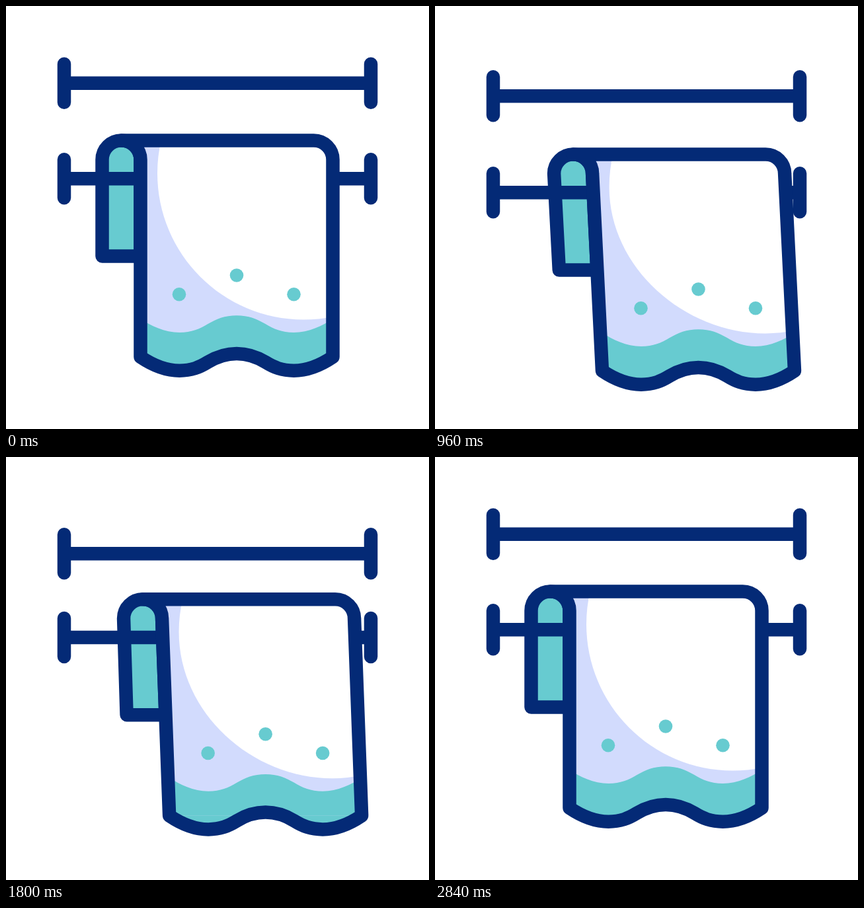
An HTML page with a canvas that plays this animation: 640 by 640 pixels, repeating every 3 s.

```html
<!DOCTYPE html>
<html lang="en">
<head>
<meta charset="utf-8">
<title>Towel on a rail</title>
<style>
  html, body { margin: 0; width: 100%; height: 100%; overflow: hidden; background: #fff; }
  canvas { display: block; width: 640px; height: 640px; }
</style>
</head>
<body>
<canvas id="stage" width="640" height="640"></canvas>
<script>
const ctx = document.getElementById('stage').getContext('2d');
const NAVY = '#042a76', TEAL = '#67cbd0', SHADE = '#d2dbfd';
const LOOP = 3000;

// Keys are [time, value]; every segment eases in and out.
const upperDrop = [[515, 0], [1312, 33], [1640, 33], [2443, 0]];
const lowerDrop = [[335, 0], [1150, 24.3], [1340, 24.3], [2240, 0]];
const slide = [[100, 0], [900, 34.6], [1669, 34.6], [2561, 0]];
const hemSwing = [[100, 0], [510, -22], [930, 15.5], [1260, -9.3], [1600, 0],
                  [2000, 22], [2390, -12.5], [2640, 6], [2840, 0]];
const flapSwing = [[100, 0], [510, -7.7], [930, 8], [1260, -4.2], [1600, 0],
                   [2000, 9], [2390, -6.5], [2640, 3], [2840, 0]];

function valueAt(keys, t) {
  if (t <= keys[0][0]) return keys[0][1];
  for (let i = 1; i < keys.length; i++) {
    const [t0, v0] = keys[i - 1], [t1, v1] = keys[i];
    if (t < t1) {
      const u = (t - t0) / (t1 - t0);
      return v0 + (v1 - v0) * u * u * (3 - 2 * u);
    }
  }
  return keys[keys.length - 1][1];
}

function fill(path, color) {
  ctx.fillStyle = color;
  ctx.fill(path);
}

function rail(y) {
  ctx.lineCap = 'round';
  ctx.stroke(new Path2D(`M88 ${y - 29}v58M552 ${y - 29}v58M88 ${y}H552`));
}

// Wavy edge from left to right, starting at the current point.
const WAVE = 'c15.5 10.5 36.5 20.7 59 20.7c18.5 0 30.5-5.2 43-12.9' +
  's25.5-12.9 43.5-12.9s31 5.2 43.5 12.9s24.5 12.9 43 12.9c22.5 0 43.5-10.2 59-20.7';

function flap(x, flapX, hemX) {
  const seam = 203.5 + x + (hemX - x) * 0.489;
  const path = new Path2D(`M${seam} 378.5H${145.5 + flapX}L${145.5 + x} 232.5` +
    `a29 29 0 0 1 58 0Z`);
  fill(path, TEAL);
  ctx.stroke(path);
}

function front(x, hemX) {
  const left = 203.5 + hemX;
  const outline = new Path2D(`M${left} 531L${203.5 + x} 232.5a29 29 0 0 0-29-29` +
    `H${465.5 + x}a29 29 0 0 1 29 29L${494.5 + hemX} 531L${left} 531${WAVE}`);
  const light = new Path2D(`M${235.5 + x} 200Q${229 + x} 226 ${229 + x} 253` +
    `C${229 + x} 375 ${328 + hemX} 474.5 ${450 + hemX} 474.5` +
    `S${671 + x} 375 ${671 + x} 253V200Z`);
  const band = new Path2D(`M${left - 10} 590V466L${left} 473.3${WAVE}l10-7V590Z`);
  const edge = new Path2D(`M${left} 531L${203.5 + x} 232.5a29 29 0 0 0-29-29` +
    `H${465.5 + x}a29 29 0 0 1 29 29L${494.5 + hemX} 531M${left} 531${WAVE}`);

  ctx.save();
  ctx.clip(outline);
  fill(outline, SHADE);
  fill(light, '#fff');
  ctx.restore();

  const body = new Path2D(`M${left} 531L${203.5 + x} 232.5V203.5H${494.5 + x}` +
    `V232.5L${494.5 + hemX} 531${WAVE.length ? '' : ''}V570H${left}Z`);
  ctx.save();
  ctx.clip(body);
  const hem = new Path2D(`M${left} 473.3${WAVE}v57.7L${left} 531Z`);
  fill(hem, TEAL);
  const fringe = new Path2D(`M${left} 531${WAVE}Z`);
  ctx.clip(band);
  fill(fringe, TEAL);
  // The crest of the lower edge rises above the hem line.
  ctx.restore();

  for (const [cx, cy] of [[262, 436.3], [349, 407.5], [435.5, 436.3]]) {
    const dot = new Path2D();
    dot.arc(cx + hemX, cy, 10.3, 0, 7);
    fill(dot, TEAL);
  }
  ctx.stroke(edge);
}

function draw(now) {
  const t = now % LOOP;
  const x = valueAt(slide, t);
  const hemX = x + valueAt(hemSwing, t);
  const flapX = x + valueAt(flapSwing, t);

  ctx.fillStyle = '#fff';
  ctx.fillRect(0, 0, 640, 640);
  ctx.strokeStyle = NAVY;
  ctx.lineWidth = 20.5;
  ctx.lineJoin = 'round';

  rail(116.8 + valueAt(upperDrop, t));
  ctx.save();
  ctx.translate(0, valueAt(lowerDrop, t));
  flap(x, flapX, hemX);
  rail(261.2);
  front(x, hemX);
  ctx.restore();
  requestAnimationFrame(draw);
}
requestAnimationFrame(draw);
</script>
</body>
</html>
```
